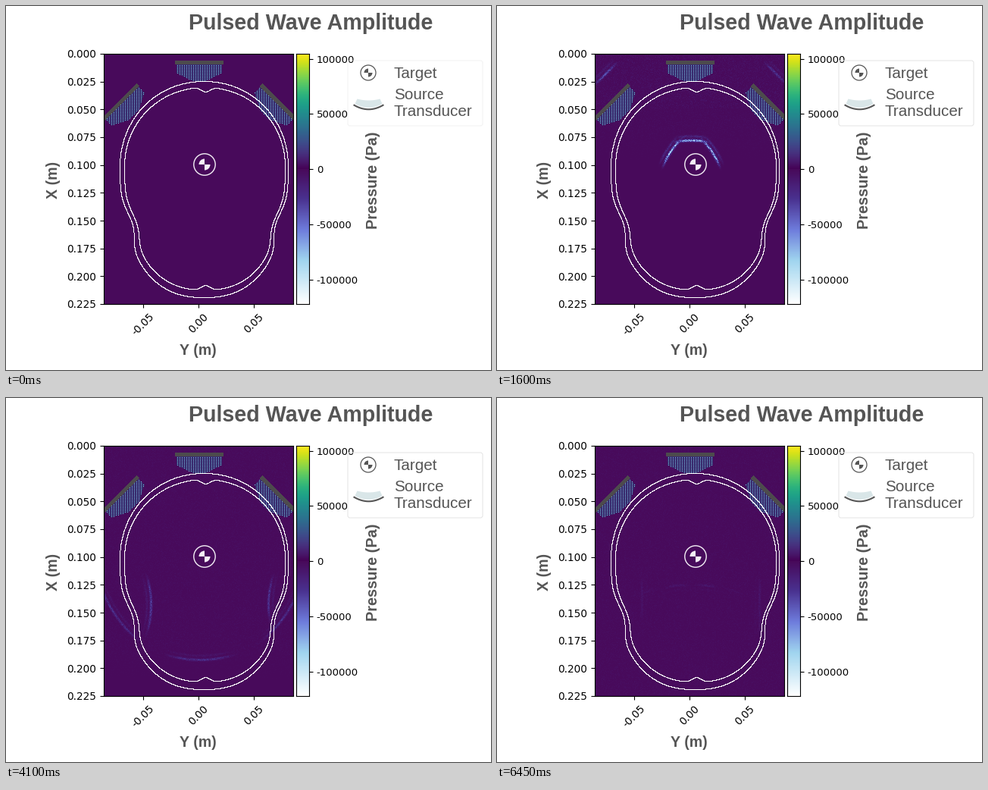
Write a matplotlib script that moves like this. It is 640 px wide and 480 px high and loops after 6540 ms.

```python
import numpy as np
import matplotlib.pyplot as plt
from matplotlib.animation import FuncAnimation
from matplotlib.colors import LinearSegmentedColormap, to_rgb
from matplotlib.patches import Circle, FancyBboxPatch, Polygon, Wedge

W, H, DPI = 640, 480, 100
LOOP, TICK, STEP = 6540, 30, 50
LAST = 129
SPEED = 0.0672            # pixels per ms
FOCUS, T_FOCUS = (256, 209), 2079
GREY, PURPLE = "#555555", "#480a5b"

plt.rcParams.update({"font.family": "DejaVu Sans", "font.size": 9.8,
                     "axes.unicode_minus": False})

negative = LinearSegmentedColormap.from_list(
    "negative", [(0, PURPLE), (0.22, "#4a3290"), (0.45, "#6e7cdc"),
                 (0.68, "#a0d5ef"), (1, "#ffffff")])

fig = plt.figure(figsize=(W / DPI, H / DPI), dpi=DPI, facecolor="white")


def add_axes(x, y, w, h, **kw):
    return fig.add_axes([x / W, 1 - (y + h) / H, w / W, h / H], **kw)


# Pressure map
X0, Y0, NX, NY = 129, 63, 250, 330
gx, gy = np.meshgrid(X0 + np.arange(NX), Y0 + np.arange(NY))
ax = add_axes(X0, Y0, NX, NY)
image = ax.imshow(np.zeros((NY, NX, 3)), extent=(-0.0855, 0.0853, 0.225, 0),
                  aspect="auto", interpolation="nearest")
ax.set_xticks([-0.05, 0, 0.05], ["-0.05", "0.00", "0.05"], rotation=45)
ticks = np.arange(0, 0.226, 0.025)
ax.set_yticks(ticks, [f"{v:.3f}" for v in ticks])

# Colour bar
P_TOP, P_LOW = 104500, -122000
bar = add_axes(383, Y0, 17, NY)
level = np.linspace(P_TOP, P_LOW, NY)
ramp = np.where((level > 0)[:, None], plt.cm.viridis(level / P_TOP),
                negative(level / P_LOW))
bar.imshow(ramp[:, None, :], extent=(0, 1, P_LOW, P_TOP), aspect="auto")
bar.set_xticks([])
bar.yaxis.tick_right()
bar.set_yticks(np.arange(-100000, 100001, 50000))
bar.tick_params(labelsize=9.5)

# Overlay in stage pixels
top = add_axes(0, 0, W, H, zorder=5)
top.set(xlim=(0, W), ylim=(H, 0))
top.axis("off")


def label(x, y, s, size, weight="bold", **kw):
    top.text(x, y, s, size=size, weight=weight, color=GREY,
             family="Liberation Sans", **kw)


mid = dict(ha="center", va="center")
label(402.5, 31, "Pulsed Wave Amplitude", 20.6, ha="center", va="baseline")
label(253.5, 454, "Y (m)", 14.1, **mid)
label(63, 229, "X (m)", 14.1, rotation=90, **mid)
label(484, 230, "Pressure (Pa)", 14.3, rotation=90, **mid)
for y, s in ((95, "Target"), (123, "Source"), (145, "Transducer")):
    label(512, y, s, 14.9, "normal", va="baseline")


def target(x, y, r, inner, color, lw):
    top.add_patch(Circle((x, y), r, fill=False, ec=color, lw=lw))
    for a in (0, 180):
        top.add_patch(Wedge((x, y), inner, a, a + 90, fc=color, lw=0))


target(262, 209, 14.2, 7.5, "#f4f0f6", 1.0)
target(478, 88, 10, 5.5, GREY, 0.9)

frame = FancyBboxPatch((454, 75), 172, 80, fill=False, ec="#e6e6e6", lw=0.8,
                       boxstyle="round,pad=3,rounding_size=3")
top.add_patch(frame)

s = np.linspace(-1, 1, 25)
cup_top = np.c_[478.5 + 15 * s, 124.5 - 2 * s ** 2]
cup_low = np.c_[478.5 + 18 * s, 134 - 5 * s ** 2]
top.add_patch(Polygon(np.vstack([cup_top, cup_low[::-1]]), fc="#d9e6e8", lw=0))
top.plot(478.5 + 19 * s, 136.3 - 5.5 * s ** 2, color=GREY, lw=1.5)


def along(x, y, angle):
    """Coordinates along and across a direction, seen from (x, y)."""
    c, s = np.cos(np.radians(angle)), np.sin(np.radians(angle))
    dx, dy = gx - x, gy - y
    return dx * c + dy * s, dy * c - dx * s


def bump(v, center, width):
    return np.exp(-((v - center) / width) ** 2)


def skull(cx, half, up, down, dent, notch):
    """Mask of a head outline: ellipse above, squarer and pinched below."""
    a = np.linspace(0, 2 * np.pi, 6000)
    c, s = np.cos(a), np.sin(a)
    n = np.where(s > 0, 2.4, 2.05)
    wide = half * np.abs(c) ** (2 / n)
    y = 212 + np.where(s > 0, down, up) * np.sign(s) * np.abs(s) ** (2 / n)
    x = cx + np.sign(c) * (wide - dent * bump(y, 290, 27))
    x = np.where(wide < 45, cx + np.sign(c) * wide, x)
    y -= notch * np.sign(s) * bump(x, 263, 8) * (np.abs(s) > 0.5)
    mask = np.zeros((NY, NX), bool)
    mask[np.rint(y - Y0).astype(int), np.rint(x - X0).astype(int)] = True
    return mask


bone = skull(261, 111, 113, 172, 10, 0) | skull(262, 106, 105, 162, 9, 6)

# Transducers: a grey bar with a dotted, tapering field in front
plate = np.zeros((NY, NX), bool)
source = plate.copy()
for x, y, angle in ((254.5, 74, 90), (151, 126, 45), (358.5, 126, 135)):
    d, side = along(x, y, angle)
    side = np.abs(side)
    plate |= (np.abs(d) < 2.6) & (side < 32)
    source |= ((d > 2.6) & (side < 30.5)
               & (d < np.minimum(24.5, 13.5 + 0.52 * (30.5 - side))))
dots = source & (gx % 3 == 1) & (gy % 2 == 0)


def ridge(u, v, length, width=1.6):
    """Bright crest along u = 0 with a weaker trailing one."""
    crest = np.exp(-(u / width) ** 2) + 0.25 * np.exp(-((u + 5.5) / width) ** 2)
    return crest * np.exp(-(v / length) ** 4)


beams = [along(*FOCUS, a) for a in (90, 34, 146)]
corners = [along(143, 89, 45), along(367, 88, 135)]


def pressure(t, rng):
    p = SPEED * (t - T_FOCUS)
    onset = 1 - np.exp(-t / 200)
    amp = 0.6 * onset * bump(t, 2000, 1900)
    length = 14 + 0.18 * abs(p)
    bend = p / (2 * (p * p + 50 ** 2))
    f = np.zeros((NY, NX))
    for u, v in beams:
        f = np.maximum(f, amp * ridge(u - p + bend * v * v, v, length))

    # Echoes in the upper corners
    shift = SPEED * ((t - 400) % 800 - 400)
    echo = 0.5 * onset * bump(t, 900, 900)
    for (u, v), k in zip(corners, (1, 0.7)):
        f += k * echo * ridge(u - shift, v, 17)

    # Echoes from the side walls
    if t > 3600:
        x = 191 + 0.066 * (t - 4100)
        a = 0.24 * np.exp(-abs(t - 4100) / 1500)
        v = gy - 272
        curl = v * v / 250 * np.exp(-max(t - 4100, 0) / 500)
        f += a * ridge(gx - x + curl, v, 32)
        f += 0.8 * a * ridge(537 - x - gx + curl, v + 8, 26)

    # Echo from the bottom wall
    if t > 4540:
        rise = 0.0665 * (t - 4540)
        v = gx - 256
        a = 0.26 * np.exp(-(t - 4540) / 1300)
        u = 373 - rise - gy + v * v * 0.0025
        f += a * ridge(u, v, 32 + 0.2 * rise) * np.sin(v * np.pi / 40) ** 2

    f *= 0.4 + 1.1 * rng.random(f.shape)

    # Weak scatter behind the front
    reach = np.clip((FOCUS[1] + p + 40 - gy) / 60, 0, 1)
    haze = onset * (0.035 + 0.14 * np.exp(-t / 900) * (gy < 135))
    f += haze * reach * rng.random(f.shape) ** 3
    return np.clip(f, 0, 1)


def draw(k):
    step = min(round(k * TICK / STEP), LAST)
    rng = np.random.default_rng(step)
    rgb = negative(pressure(step * STEP, rng))[..., :3]
    rgb[source] = 0.5 * rgb[source] + 0.5 * np.array(to_rgb("#2a4a80"))
    rgb[dots] = to_rgb("#78bedc")
    rgb[plate] = to_rgb("#4d4b4d")
    rgb[bone] = 1
    image.set_data(rgb)
    frame.set_alpha(0.5 if step == 0 else 1)
    return image, frame


anim = FuncAnimation(fig, draw, frames=LOOP // TICK, interval=TICK,
                     repeat=True, repeat_delay=0, blit=False)
plt.show()
```
